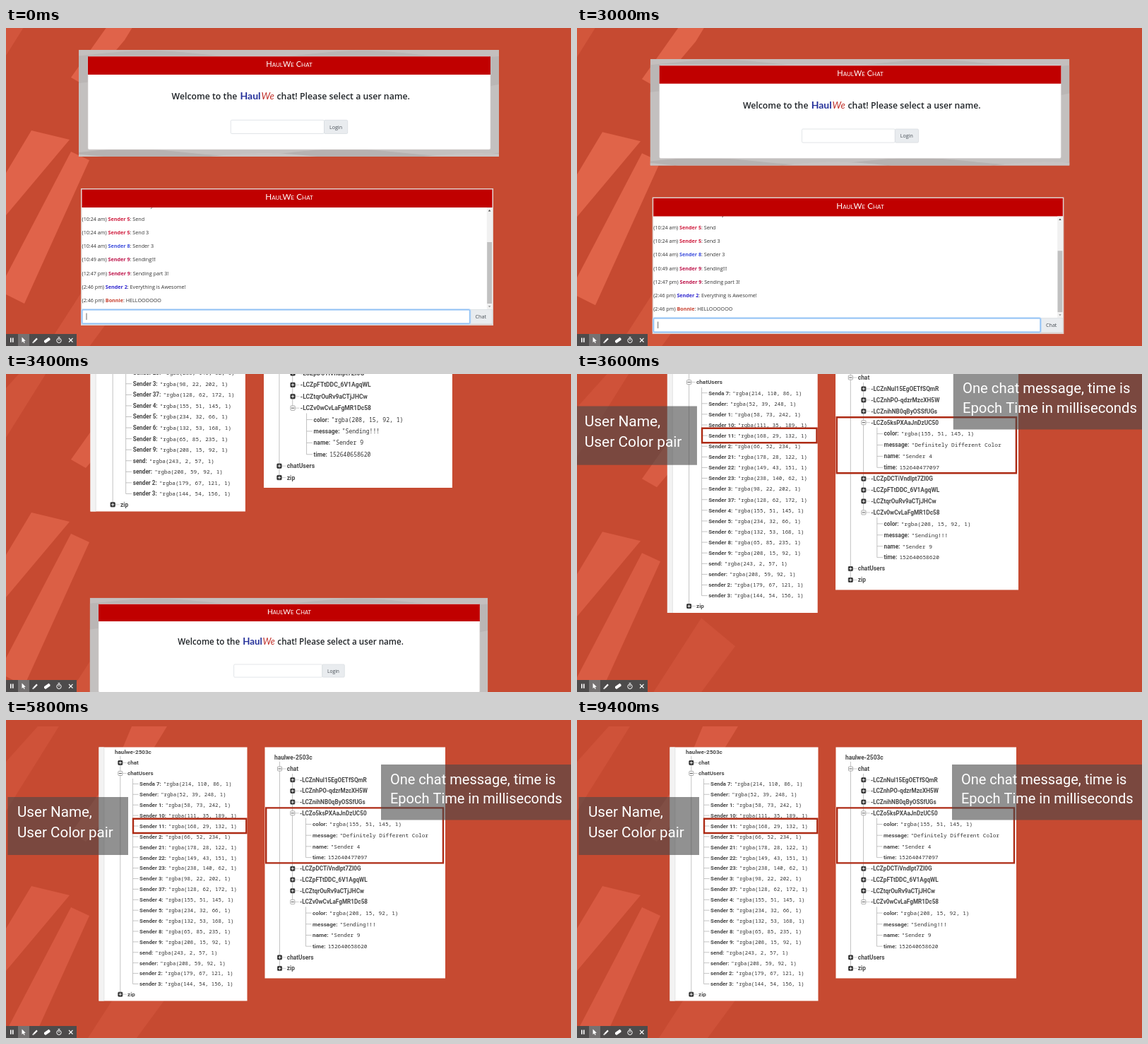
An HTML page with a canvas for the animation above (9600 ms loop, 800 by 450 pixels).

```html
<!DOCTYPE html>
<html lang="en">
<head>
<meta charset="utf-8">
<title>Chat slides</title>
<style>
html, body { margin: 0; width: 100%; height: 100%; overflow: hidden; background: #c64a31; }
canvas { display: block; width: 800px; height: 450px; }
</style>
</head>
<body>
<canvas id="stage" width="800" height="450"></canvas>
<script>
const ctx = document.getElementById('stage').getContext('2d');
const LOOP = 9600, STEP = 200;
const PAN = { start: 2910, length: 903 };
const SANS = '"Open Sans", "Noto Sans", sans-serif';
const LATO = 'Lato, sans-serif';
const ROBOTO = 'Roboto, sans-serif';
const MONO = '"Noto Sans Mono", "DejaVu Sans Mono", monospace';
const BRAND = ['Haul', 'We'];
const RED = '#c00000', FRAME = '#ad2a14';

function box(x1, y1, x2, y2, fill, stroke, width = 1, radius = 0) {
  ctx.beginPath();
  ctx.roundRect(x1, y1, x2 - x1, y2 - y1, radius);
  if (fill) { ctx.fillStyle = fill; ctx.fill(); }
  if (stroke) { ctx.strokeStyle = stroke; ctx.lineWidth = width; ctx.stroke(); }
}

function poly(points, fill) {
  ctx.beginPath();
  points.forEach(([x, y]) => ctx.lineTo(x, y));
  ctx.closePath();
  ctx.fillStyle = fill;
  ctx.fill();
}

function line(x1, y1, x2, y2, color, width = 1) {
  ctx.beginPath();
  ctx.moveTo(x1, y1);
  ctx.lineTo(x2, y2);
  ctx.strokeStyle = color;
  ctx.lineWidth = width;
  ctx.stroke();
}

// Writes text and returns the x where it ends.
function write(text, x, y, font, color, align = 'left') {
  ctx.font = font;
  ctx.fillStyle = color;
  ctx.textAlign = align;
  ctx.fillText(text, x, y);
  return x + ctx.measureText(text).width;
}

function backdrop(p) {
  ctx.fillStyle = '#c64a31';
  ctx.fillRect(0, 0, 800, 450);
  ctx.save();
  ctx.translate(0, 90 * (p - 0.233));
  ctx.globalAlpha = 0.9 - 0.3 * p;
  const light = '#e4674d';
  poly([[92, 91], [113, 103], [168, 38], [228, -60], [178, -60], [148, 12]], light);
  poly([[36, 166], [90, 179], [0, 286], [0, 226]], light);
  poly([[92, 196], [118, 208], [26, 411], [0, 398], [0, 372]], light);
  ctx.globalAlpha *= 0.45;
  poly([[176, 288], [224, 328], [112, 480], [52, 480]], light);
  poly([[0, 60], [0, -10], [45, -60], [75, -60]], light);
  ctx.restore();
}

function titleBar(x1, y1, x2, y2, size, baseline) {
  box(x1, y1, x2, y2, RED);
  write(BRAND.join('') + ' Chat', 401, baseline, `small-caps ${size}px ${LATO}`, '#fff', 'center');
}

function wave(y, amp, phase, color) {
  ctx.beginPath();
  ctx.moveTo(103, 182);
  for (let x = 103; x <= 698; x += 5) ctx.lineTo(x, y + amp * Math.sin(x / 48 + phase));
  ctx.lineTo(698, 182);
  ctx.fillStyle = color;
  ctx.fill();
}

function loginPanel() {
  ctx.save();
  ctx.beginPath();
  ctx.rect(103, 31, 595, 151);
  ctx.clip();
  box(103, 31, 698, 182, '#c4bfbe');
  wave(37, 5, 0.5, '#bab6b5');
  wave(90, 14, 2, '#c3c0bf');
  wave(176, 5, 1, '#b6b2b1');
  wave(182, 5, 3.4, '#c8c4c3');
  ctx.restore();
  box(116, 40, 686, 172, '#fff', '#d4cfce', 0.6, 2);
  titleBar(116, 40.3, 686, 66, 11, 55);

  const heading = `600 12.3px ${SANS}`;
  write('Welcome to the', 234.5, 101, heading, '#212529');
  write(BRAND[0], 331.5, 101, `bold 14px ${LATO}`, '#24309a');
  write(BRAND[1], 361.5, 101, `italic 13.2px ${LATO}`, '#c0302a');
  write('chat! Please select a user name.', 383.5, 101, heading, '#212529');

  box(318.3, 130.3, 450.5, 149.5, '#fff', '#d5dade', 0.7, 1.5);
  box(450.5, 130.3, 483.7, 149.5, '#e9ecef', '#d5dade', 0.7, 1.5);
  write('Login', 467, 142.8, `7.1px ${SANS}`, '#495057', 'center');
}

const messages = [
  ['10:24 am', 'Sender 5', '#cf1b3d', 'Send'],
  ['10:24 am', 'Sender 5', '#cf1b3d', 'Send 3'],
  ['10:44 am', 'Sender 8', '#3a4bdc', 'Sender 3'],
  ['10:49 am', 'Sender 9', '#bd1248', 'Sending!!!'],
  ['12:47 pm', 'Sender 9', '#bd1248', 'Sending part 3!'],
  ['2:46 pm', 'Sender 2', '#2f26cf', 'Everything is Awesome!'],
  ['2:46 pm', 'Bonnie', '#c8402f', 'HELLOOOOOO']
];

function chatPanel() {
  box(106, 227, 690, 421, '#dfd0cc');
  box(107.5, 229, 688.5, 419, '#fff');
  const plain = `7.2px ${SANS}`;
  write('y', 204.5, 254, plain, '#333');
  titleBar(107.5, 228.6, 688.5, 254, 11.7, 243.3);

  messages.forEach(([time, name, color, text], i) => {
    const y = 272.7 + 19.25 * i;
    let x = write(`(${time}) `, 107.5, y, plain, '#333');
    x = write(name, x, y, `bold 7.2px ${SANS}`, color);
    write(': ' + text, x, y, plain, '#333');
  });

  box(680.8, 254, 688.5, 398, '#f1f1f1');
  box(681.2, 303, 688, 390, '#c1c1c1');
  poly([[682.8, 259.5], [686.4, 259.5], [684.6, 257]], '#505050');
  poly([[682.8, 393], [686.4, 393], [684.6, 395.5]], '#a3a3a3');

  box(657, 398.5, 688.5, 418.5, '#e9ecef', '#d5dade', 0.7);
  write('Chat', 672.3, 411.4, plain, '#495057', 'center');
  box(107.5, 398.5, 657, 418.5, '#fff', '#bcd9f7', 2.6, 1.5);
  box(107.7, 398.7, 656.8, 418.3, null, '#80b8f5', 0.9, 1.5);
  line(114, 403.5, 114, 413, '#444', 0.8);
}

function knob(x, y, open) {
  box(x - 3, y - 3, x + 3, y + 3, open ? '#fff' : '#333', open ? '#999' : '#333', 0.8, 0.8);
  const color = open ? '#444' : '#fff';
  line(x - 2, y, x + 2, y, color, 0.9);
  if (!open) line(x, y - 2, x, y + 2, color, 0.9);
}

// A folder row: dash, knob and label.
function branch(x, y, label, open, size) {
  line(x + 3, y, x + 9, y, '#c4c4c4', 0.8);
  knob(x, y, open);
  write(label, x + 10.3, y + 2.8, `bold ${size}px ${ROBOTO}`, '#484848');
}

// A value row: dash, bold key, monospaced value.
function leaf(x, y, key, value, size, monoSize) {
  line(x, y, x + 8, y, '#b5b5b5', 0.8);
  const end = write(key + ':', x + 9.6, y + 2.8, `bold ${size}px ${ROBOTO}`, '#484848');
  write(value, end + 3, y + 2.8, `${monoSize}px ${MONO}`, '#333');
}

const rgba = c => `"rgba(${c.replace(/ /g, ', ')}, 1)`;

const users = `Senda 7|214 110 86;Sender|52 39 248;Sender 1|58 73 242;Sender 10|111 35 189
Sender 11|168 29 132;Sender 2|66 52 234;Sender 21|178 28 122;Sender 22|149 43 151
Sender 23|238 140 62;Sender 3|98 22 202;Sender 37|128 62 172;Sender 4|155 51 145
Sender 5|234 32 66;Sender 6|132 53 168;Sender 8|65 85 235;Sender 9|208 15 92
send|243 2 57;sender|208 59 92;sender 2|179 67 121;sender 3|144 54 156`
  .split(/[;\n]/).map(row => row.split('|'));

const DB = BRAND.join('').toLowerCase() + '-2503c';

function usersPanel() {
  box(131.5, 38.5, 341.5, 397.5, '#fff');
  box(131.5, 38.5, 138.5, 397.5, '#f3f3f3');
  line(138.8, 38.5, 138.8, 397.5, '#dcdcdc', 0.8);
  write(DB, 154, 48.2, `bold 8.1px ${ROBOTO}`, '#484848');
  line(161.8, 51, 161.8, 388, '#b5b5b5', 0.8);
  line(179.5, 83, 179.5, 373.5, '#b5b5b5', 0.8);
  branch(161.8, 60.5, 'chat', false, 8);
  branch(161.8, 75.5, 'chatUsers', true, 8);
  users.forEach(([name, color], i) => leaf(179.5, 90.4 + 14.9 * i, name, rgba(color), 7.8, 7.35));
  branch(161.8, 388.2, 'zip', false, 8);
  box(180, 139.7, 340.3, 160, null, FRAME, 2.4);
}

// "+" closed key, "-" open key, others are fields of the open key.
const chatRows = [
  '+-LCZnNul15EgOETfSQmR', '+-LCZnhPO-qdzrMzcXH5W', '+-LCZnihNB0qByOSSfUGs',
  '--LCZo5ksPXAaJnDzUC50', ['color', rgba('155 51 145')],
  ['message', '"Definitely Different Color'], ['name', '"Sender 4'], ['time', '152640477097'],
  '+-LCZpDCTiVndlpt7ZI0G', '+-LCZpFTtDDC_6V1AgqWL', '+-LCZtqrOuRv9aCTjJHCw',
  '--LCZv0wCvLaFgMR1Dc58', ['color', rgba('208 15 92')],
  ['message', '"Sending!!!'], ['name', '"Sender 9'], ['time', '152640658620']
];

function messagesPanel() {
  const rowY = k => 69 + 15.7 * k;
  box(366.5, 38.5, 622, 365.5, '#fff');
  write(DB, 380, 55.8, `bold 8.4px ${ROBOTO}`, '#484848');
  line(387.5, 59, 387.5, 351, '#b5b5b5', 0.8);
  line(405.5, 76, 405.5, rowY(12), '#b5b5b5', 0.8);
  branch(387.5, rowY(0), 'chat', true, 8.3);
  ctx.save();
  ctx.beginPath();
  ctx.rect(366.5, 38.5, 236, 327);
  ctx.clip();
  for (const k of [4, 12]) line(424.5, rowY(k) + 7, 424.5, rowY(k + 4), '#b5b5b5', 0.8);
  chatRows.forEach((row, i) => {
    const y = rowY(i + 1);
    if (Array.isArray(row)) leaf(424.5, y, row[0], row[1], 8.1, 7.75);
    else branch(405.8, y, row.slice(1), row[0] === '-', 8.2);
  });
  ctx.restore();
  branch(387.5, rowY(17), 'chatUsers', false, 8.3);
  branch(387.5, rowY(18), 'zip', false, 8.3);
  box(368.2, 124.4, 619, 202.4, null, FRAME, 2.4);
}

function note(x1, y1, x2, y2, x, y, gap, size, lines) {
  box(x1, y1, x2, y2, 'rgba(72,72,72,0.6)');
  lines.forEach((text, i) => write(text, x, y + gap * i, `${size}px ${ROBOTO}`, '#fff'));
}

function toolbar() {
  box(0, 433, 100, 450, '#4d4b4b');
  box(17, 433, 33, 450, '#757272');
  const white = '#fff';
  box(6, 438.5, 7.6, 444.8, white);
  box(9, 438.5, 10.6, 444.8, white);
  poly([[22.5, 437.5], [22.5, 445], [24.3, 443.6], [25.6, 446], [26.7, 445.4], [25.5, 443], [27.8, 442.8]], white);
  line(39.2, 444.2, 44, 439.4, white, 2.2);
  poly([[37.4, 446], [38, 443.6], [39.8, 445.4]], white);
  poly([[54, 442.2], [60.5, 437.8], [62.5, 439.4], [62.5, 441.6], [56, 446], [54, 444.4]], white);
  ctx.beginPath();
  ctx.arc(75, 442.3, 3.2, 0, 7);
  ctx.strokeStyle = white;
  ctx.lineWidth = 1;
  ctx.stroke();
  line(75, 442.5, 75, 440.3, white);
  line(73.6, 437.6, 76.4, 437.6, white);
  line(89, 439, 94.5, 444.5, white, 1.1);
  line(94.5, 439, 89, 444.5, white, 1.1);
}

function render(t) {
  const u = Math.min(1, Math.max(0, (t - PAN.start) / PAN.length));
  const p = (1 - Math.cos(Math.PI * u)) / 2;
  const zoom = 1.103 - 0.103 * p;
  const camY = 690.5 - 465.5 * p;

  backdrop(p);
  ctx.save();
  ctx.translate(400, 225);
  ctx.scale(zoom, zoom);
  ctx.translate(-400, -camY);
  usersPanel();
  messagesPanel();
  note(2.5, 109, 173, 191, 16, 137.3, 28.3, 20.6, ['User Name,', 'User Color pair']);
  note(531, 63, 815, 141.5, 544, 91, 27.3, 20, ['One chat message, time is', 'Epoch Time in milliseconds']);

  ctx.translate(400, 690.5);
  ctx.scale(1 / 1.103, 1 / 1.103);
  ctx.translate(-400, -225);
  loginPanel();
  chatPanel();
  ctx.restore();
  toolbar();
}

const begin = performance.now();
function tick() {
  const t = (performance.now() - begin) % LOOP;
  render(Math.floor(t / STEP) * STEP);
  requestAnimationFrame(tick);
}
tick();
</script>
</body>
</html>
```
